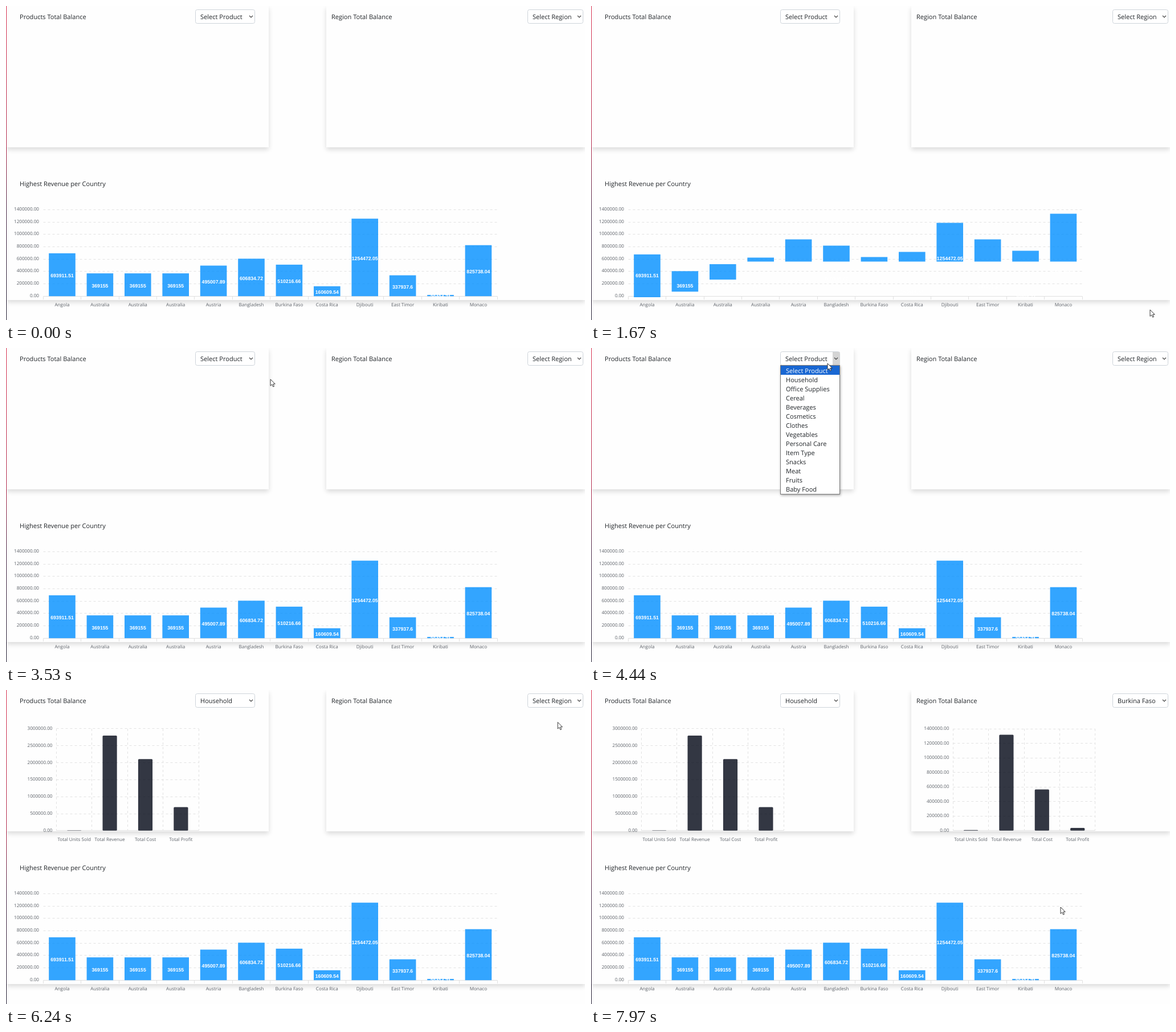
These frames come from a looping animation (1016 by 551 pixels, 8 s). An HTML page:

```html
<!DOCTYPE html>
<html lang="en">
<head>
<meta charset="utf-8">
<title>Balance dashboard</title>
<style>
  html, body { margin: 0; width: 100%; height: 100%; overflow: hidden; background: #fefefe; }
  .view { position: relative; width: 100%; height: 100%; overflow: hidden; contain: strict; }
  svg { display: block; position: absolute; left: 0; top: 0; width: 100%; height: 100%; }
  .edge { position: absolute; left: 0; top: 0; width: 1px; height: 100%;
    background: linear-gradient(#d8304f, #b02a4c 45%, #4a2a48 65%, #231f33); }
  .card { position: absolute; top: 0; background: #fefefe; box-shadow: 0 4px 8px rgba(0, 0, 0, .14); }
  text { font-family: "Open Sans", "Noto Sans", sans-serif; fill: #212529; text-rendering: geometricPrecision; }
  .title { font-size: 11.05px; }
  .pick { font-size: 11.05px; }
  .axis { font-size: 8.15px; fill: #5a5f66; }
  .end { text-anchor: end; }
  .mid { text-anchor: middle; }
  .value { font: bold 8.7px "Liberation Sans", Arial, sans-serif; fill: #fff; text-anchor: middle; }
  .grid { stroke: #e2e2e2; stroke-dasharray: 4 4; }
  .line { stroke: #e0e0e0; }
  .blue { fill: rgba(0, 143, 255, .8); }
  .dark { fill: rgba(0, 5, 20, .8); }
  .menu { filter: drop-shadow(1px 2px 2px rgba(0, 0, 0, .3)); }
</style>
</head>
<body>
<div class="view">
  <div id="cards">
    <div class="card" style="left:1px;width:1015px;height:516px"></div>
    <div class="card" style="left:1px;width:460px;height:248px"></div>
    <div class="card" style="left:562px;width:454px;height:248px"></div>
  </div>
  <div class="edge"></div>
  <svg id="stage" viewBox="0 0 1016 551"></svg>
</div>
<script>
const LOOP = 8000;
const stage = document.getElementById('stage');
const cards = document.getElementById('cards');

function el(tag, attrs, parent = stage, text) {
  const node = document.createElementNS('http://www.w3.org/2000/svg', tag);
  set(node, attrs);
  if (text !== undefined) node.textContent = text;
  return parent.appendChild(node);
}
function set(node, attrs) {
  for (const k in attrs) node.setAttribute(k, attrs[k]);
}
const show = (node, on) => { node.style.display = on ? '' : 'none'; };
const label = (parent, cls, x, y, text) => el('text', { class: cls, x, y }, parent, text);
const rule = (parent, cls, x1, y1, x2, y2) => el('line', { class: cls, x1, y1, x2, y2 }, parent);
const clamp = v => Math.max(0, Math.min(1, v));
const mix = (a, b, p) => a + (b - a) * p;

const page = el('g', {});
label(page, 'title', 24, 23, 'Products Total Balance');
label(page, 'title', 571, 23, 'Region Total Balance');
label(page, 'title', 24, 316, 'Highest Revenue per Country');

// Revenue chart
const BASE = 509.2, HEIGHT = 151.8, STEP = 66.4, FIRST = 98.5, FLOAT = 448.5;
const countries = [
  ['Angola', 693911.51, 80], ['Australia', 369155, 9], ['Australia', 369155, 13],
  ['Australia', 369155, 7], ['Austria', 495007.89, 39], ['Bangladesh', 606834.72, 28],
  ['Burkina Faso', 510216.66, 8], ['Costa Rica', 160609.54, 17], ['Djibouti', 1254472.05, 68],
  ['East Timor', 337937.6, 39], ['Kiribati', 20404.71, 19], ['Monaco', 825738.04, 84]
];
const revenue = el('g', {}, page);
for (let i = 0; i <= 7; i++) {
  const y = BASE - HEIGHT * i / 7;
  if (i) rule(revenue, 'grid', 65.5, Math.floor(y) + .5, 862, Math.floor(y) + .5);
  label(revenue, 'axis end', 58, y + 1.6, (i * 200000).toFixed(2));
}
rule(revenue, 'line', 65.5, 509.5, 862, 509.5);
for (let i = 0; i <= 12; i++) {
  const x = Math.floor(65.3 + STEP * i) + .5;
  rule(revenue, 'line', x, 509.5, x, 515);
}
const blueBars = countries.map(([name, value, start], i) => {
  const x = FIRST + STEP * i, top = BASE - HEIGHT * value / 1.4e6;
  label(revenue, 'axis mid', x, 527, name);
  const node = el('rect', { class: 'blue', x: x - 23.3, width: 46.6 }, revenue);
  return { node, top, start };
});
countries.forEach(([, value], i) =>
  label(revenue, 'value', FIRST + STEP * i, BASE - HEIGHT * value / 2.8e6 + 4.7, value));

const overshoot = u => 1 - (1 - u) * (1 - 1.5 * u);
function drawRevenue(t) {
  blueBars.forEach(({ node, top, start }, i) => {
    const p = t < 1400 ? 1 : overshoot(clamp((t - 1546 - 42 * i) / 168));
    const y = mix(FLOAT - start, top, p);
    set(node, { y, height: mix(FLOAT, BASE, p) - y });
  });
}

// Balance charts
function balanceChart(left, max, steps, values, begin) {
  const g = el('g', {}, page), base = 246.8, height = 178.8, col = 62.4;
  for (let i = 0; i <= steps; i++) {
    const y = base - height * i / steps, line = Math.floor(y) + .5;
    rule(g, i ? 'grid' : 'line', left, line, left + 4 * col, line);
    label(g, 'axis end', left - 7, y + 2, (max * i / steps).toFixed(2));
  }
  for (let i = 0; i <= 4; i++) {
    const x = Math.floor(left + col * i) + .5;
    rule(g, 'grid', x, 68, x, base);
  }
  const bars = values.map((value, i) => {
    const x = left + col * (i + .5);
    label(g, 'axis mid', x, 265, ['Total Units Sold', 'Total Revenue', 'Total Cost', 'Total Profit'][i]);
    return el('rect', { class: 'dark', x: x - 12.6, width: 25.2, rx: 1.5 }, g);
  });
  return t => {
    show(g, t >= begin);
    bars.forEach((bar, i) => {
      const u = clamp((t - begin) / 175 - i);
      const h = height * values[i] / max * (1 - Math.cos(Math.PI * u)) / 2;
      set(bar, { y: base - h, height: h });
    });
  };
}
const drawProduct = balanceChart(88.5, 3e6, 6, [9000, 2.8e6, 2.105e6, 6.95e5], 5192);
const drawRegion = balanceChart(635.3, 1.4e6, 7, [9000, 1.318e6, 5.66e5, 7.52e5], 7421);

// Drop-down lists
function dropdown(x, w, textX, options, openAt, closeAt, picked) {
  const box = el('g', {}, page);
  el('rect', { x: x + .5, y: 6.5, width: w - 1, height: 24, rx: 3, fill: '#fff', stroke: '#ced4da' }, box);
  const button = el('rect', { x: x + w - 13, y: 7, width: 12.5, height: 23, fill: '#d4d4d4' }, box);
  const text = label(box, 'pick', textX, 23, options[0]);
  const cx = x + w - 7;
  el('path', { d: `M${cx - 3} 17l3 3 3-3`, fill: 'none', stroke: '#444', 'stroke-width': 1.2 }, box);

  const list = el('g', { class: 'menu' }, page);
  el('rect', { x: x + .5, y: 30.5, width: w - 1, height: 226, fill: '#fff', stroke: '#767676' }, list);
  const mark = el('rect', { x: x + 1, width: w - 2, height: 16, fill: '#1967d2' }, list);
  const rows = options.map((o, i) => label(list, 'pick', textX + 1, 44 + 16 * i, o));

  return (t, mx, my) => {
    const open = t >= openAt && t < closeAt;
    const over = mx > x && mx < x + w && my > 6 && my < 31;
    const row = Math.max(0, Math.floor((my - 32) / 16));
    show(list, open);
    show(button, open || over);
    text.textContent = options[t >= closeAt ? picked : 0];
    if (!open) return;
    set(mark, { y: row ? 32 + 16 * row : 31 });
    rows.forEach((r, i) => { r.style.fill = i === row ? '#fff' : ''; });
  };
}
const products = ['Select Product', 'Household', 'Office Supplies', 'Cereal', 'Beverages', 'Cosmetics',
  'Clothes', 'Vegetables', 'Personal Care', 'Item Type', 'Snacks', 'Meat', 'Fruits', 'Baby Food'];
const regions = countries.map(c => c[0]);
regions.splice(8, 0, 'Country');
regions.unshift('Select Region');
const drawProductList = dropdown(332, 105, 341, products, 4010, 5060, 1);
const drawRegionList = dropdown(915, 98, 924, regions, 6560, 7200, 7);

// Pointer
const pointer = el('path', {
  d: 'M0 0V11.5L2.7 9L4.6 13.2L6.5 12.4L4.7 8.3H8.2Z',
  fill: '#fff', stroke: '#222', 'stroke-width': .9, 'stroke-linejoin': 'round'
});
const path = [
  [70, 974, 537], [140, 971, 529], [210, 974, 523], [290, 979, 528], [400, 981, 533], [2560, 981, 533],
  [2640, 800, 440], [2780, 454, 240], [2920, 571, 133], [3050, 571, 133], [3500, 470, 60], [3740, 424, 20],
  [3880, 421, 16], [4220, 415, 27], [4500, 415, 27], [4860, 406, 51], [5450, 406, 51], [5750, 700, 47],
  [6170, 956, 70], [6450, 1004, 17], [6600, 1004, 17], [7000, 965, 152], [7550, 965, 152], [7970, 824, 381]
];
function pointerAt(t) {
  const i = path.findIndex(p => p[0] > t);
  if (i < 0) return path[path.length - 1].slice(1);
  if (i === 0) return [-50, -50];
  const [t0, x0, y0] = path[i - 1], [t1, x1, y1] = path[i];
  const p = (t - t0) / (t1 - t0);
  return [mix(x0, x1, p), mix(y0, y1, p)];
}

function draw(t) {
  const [mx, my] = pointerAt(t);
  const loaded = t < 1070 || t >= 1200;
  show(page, loaded);
  show(cards, loaded);
  show(revenue, t < 1070 || t >= 1400);
  drawRevenue(t);
  drawProduct(t);
  drawRegion(t);
  drawProductList(t, mx, my);
  drawRegionList(t, mx, my);
  set(pointer, { transform: `translate(${mx} ${my})` });
}
function tick() {
  draw(performance.now() % LOOP);
  requestAnimationFrame(tick);
}
tick();
</script>
</body>
</html>
```
